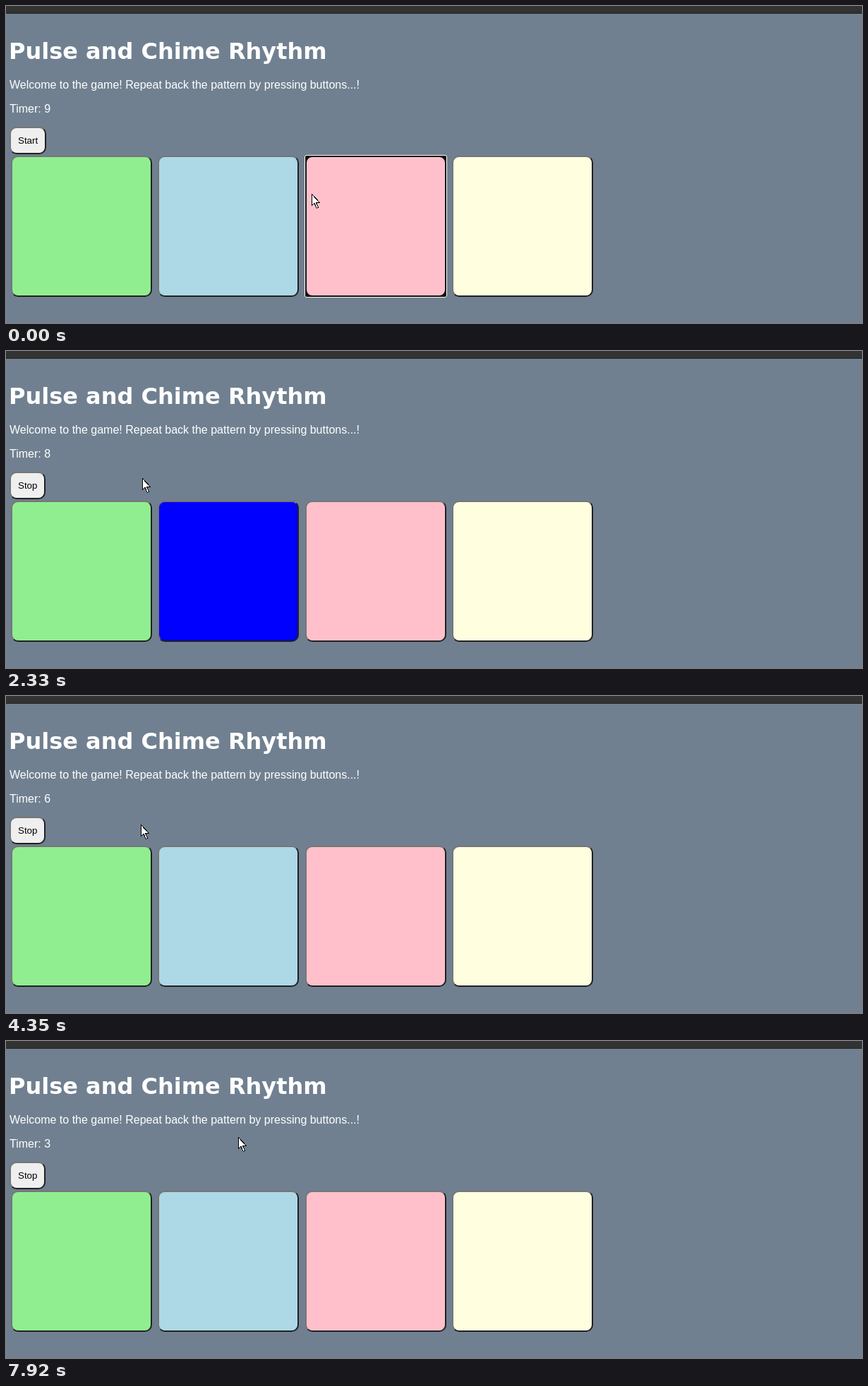
An HTML page for the animation above (8000 ms loop, 1213 by 449 pixels).

```html
<!DOCTYPE html>
<html lang="en">
<head>
<meta charset="utf-8">
<title>Memory game</title>
<style>
  html, body { margin: 0; width: 100%; height: 100%; overflow: hidden; }
  body { position: relative; background: #708090; color: #fff; font: 16px/18px "Liberation Sans", Arial, sans-serif; }
  body > * { position: absolute; margin: 0; white-space: pre; }
  .bar { left: 0; top: 0; width: 100%; height: 10px; background: #333; border-bottom: 1px solid #222; }
  h1 { left: 4px; top: 44px; font: bold 32px/40px "DejaVu Sans", Verdana, sans-serif; }
  .intro { left: 5px; top: 103px; }
  .timer { left: 5px; top: 137px; }
  .toggle, .tile {
    box-sizing: border-box;
    border: 2px solid;
    border-color: #767676 #212121 #212121 #767676;
    border-radius: 10px;
  }
  .toggle { left: 5px; top: 171px; height: 39px; padding: 10px; background: #efefef; color: #000; font-size: 13.333px; line-height: 15px; }
  .tile { top: 212px; width: 200px; height: 200px; }
  .ring {
    box-sizing: border-box;
    left: 423px; top: 211px; width: 202px; height: 202px;
    border: 1px solid #fff;
    border-radius: 3px;
    background: #101010;
  }
  .ring.on + .tile { border-color: #101010; }
  .ring:not(.on) { visibility: hidden; }
  .cursor { left: 0; top: 0; width: 13px; height: 22px; }
</style>
</head>
<body>
<div class="bar"></div>
<h1>Pulse and Chime Rhythm</h1>
<p class="intro">Welcome to the game! Repeat back the pattern by pressing buttons...!</p>
<p class="timer">Timer: 9</p>
<div class="toggle">Start</div>
<div class="tile" style="left:7px;background:lightgreen"></div>
<div class="tile blue" style="left:215.45px;background:lightblue"></div>
<div class="ring on"></div>
<div class="tile" style="left:424px;background:pink"></div>
<div class="tile" style="left:632.3px;background:lightyellow"></div>
<svg class="cursor" viewBox="0 0 13 22" shape-rendering="crispEdges">
  <path d="M.5 .5V16.5L4 13.2 7.3 20.5 9.5 19.5 6.6 12.5H11.5Z" fill="#fff" stroke="#000" stroke-linejoin="round"/>
</svg>
<script>
const LOOP = 8000;
const TICK = 124, TICK_LEAD = 40;          // the pointer is redrawn once per tick
const CLICK = 1350, COUNT_FROM = 1310;

// Turning points of the pointer: [tick, x, y]
const stops = [
  [0, 433, 266], [5, 90, 181], [8, 34, 201], [11, 34, 200],
  [14, 196, 180], [18, 193, 180], [23, 192, 182], [45, 191, 182],
  [47, 346, 154], [48, 425, 173], [51, 692, 175], [54, 566, 166],
  [61, 305, 136], [64, 329, 136]
];

const find = selector => document.querySelector(selector);
const timer = find('.timer'), toggle = find('.toggle'), blue = find('.blue');
const ring = find('.ring'), cursor = find('.cursor');

const ease = p => p * p * (3 - 2 * p);
const mix = (a, b, p) => Math.round(a + (b - a) * p);

function pointerAt(t) {
  const tick = Math.floor((t + TICK_LEAD) / TICK);
  const i = stops.findLastIndex(([start]) => start <= tick);
  const [start, x, y] = stops[i];
  const [end, nextX, nextY] = stops[i + 1] ?? [start + 1, x, y];
  const p = ease((tick - start) / (end - start));
  return [mix(x, nextX, p), mix(y, nextY, p)];
}

function setText(node, text) {
  if (node.textContent !== text) node.textContent = text;
}

function draw() {
  const t = performance.now() % LOOP;
  const [x, y] = pointerAt(t);
  const left = 9 - Math.max(0, Math.floor((t - COUNT_FROM) / 1000));
  cursor.style.transform = `translate(${x}px, ${y}px)`;
  setText(timer, `Timer: ${left}`);
  setText(toggle, t < CLICK ? 'Start' : 'Stop');
  ring.classList.toggle('on', t < CLICK);
  blue.style.backgroundColor = left === 8 ? 'blue' : 'lightblue';
  requestAnimationFrame(draw);
}
draw();
</script>
</body>
</html>
```
